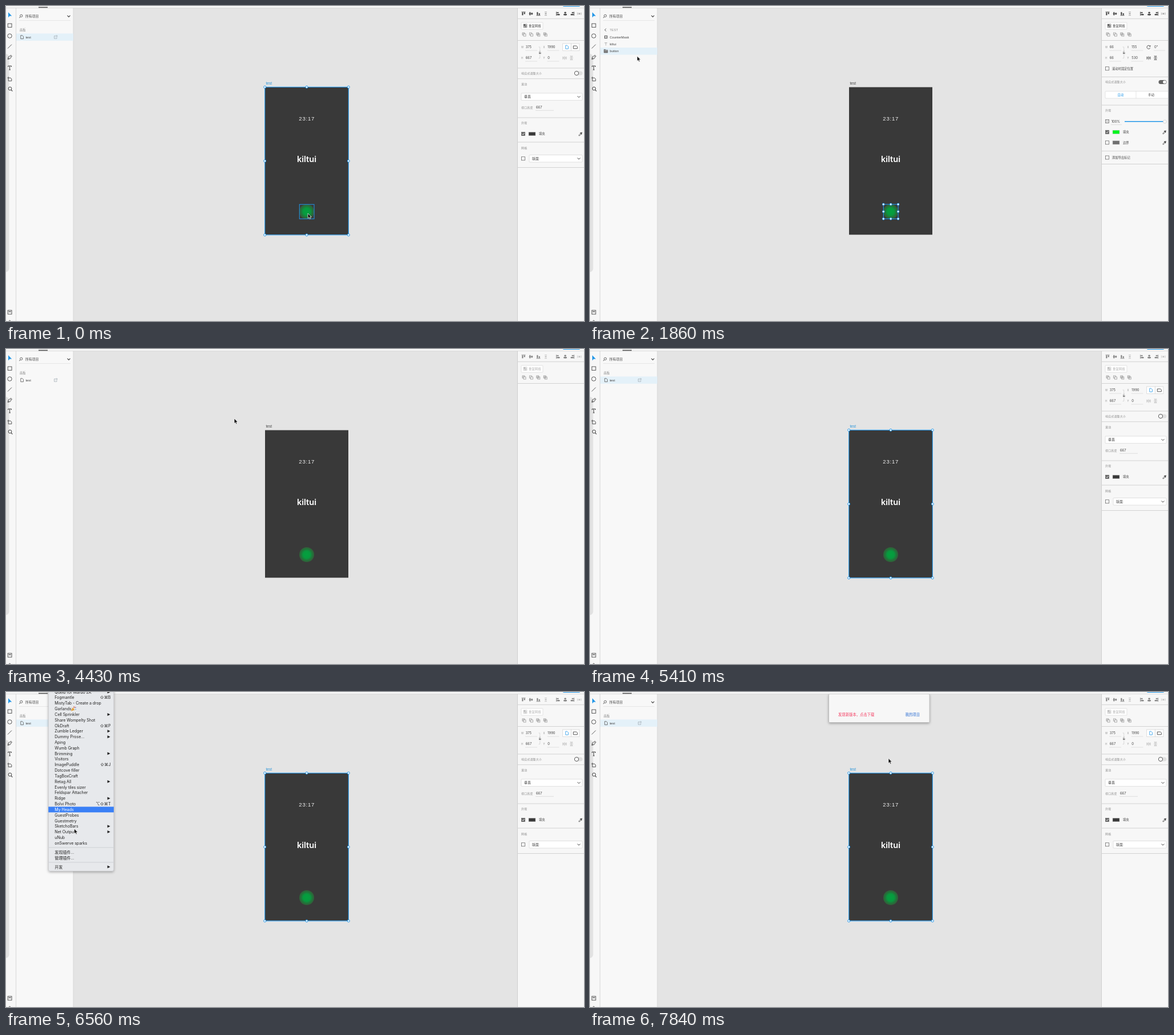
An HTML page for the animation above (8 s loop, 1013 by 553 pixels).

```html
<!DOCTYPE html>
<html lang="zh-CN">
<head>
<meta charset="utf-8">
<title>Design tool</title>
<style>
html, body { margin: 0; width: 100%; height: 100%; background: #e4e4e4; }
svg { display: block; position: fixed; inset: 0; width: 100%; height: 100%; }
text { font-family: Inter, "Noto Sans CJK SC", "Noto Sans CJK", "DejaVu Sans", sans-serif; white-space: pre; }
.arial { font-family: "Liberation Sans", "Noto Sans CJK SC", "Noto Sans CJK", sans-serif; }
.menu { letter-spacing: -.08px; }
.label { letter-spacing: .25px; }
</style>
</head>
<body>
<svg id="stage" viewBox="0 0 1013 553" xmlns="http://www.w3.org/2000/svg"></svg>
<script>
const INK = '#444', GREY = '#8c8c8c', PALE = '#b4b4b4', BLUE = '#2196e8', RULE = '#d9d9d9';

// SVG helpers; text is placed by its vertical centre
const rect = (x, y, w, h, fill = 'none', more = '') =>
  `<rect x="${x}" y="${y}" width="${w}" height="${h}" fill="${fill}" ${more}/>`;
const path = (d, stroke = INK, width = .9, fill = 'none') =>
  `<path d="${d}" stroke="${stroke}" stroke-width="${width}" fill="${fill}"/>`;
const circle = (x, y, r, fill = 'none', stroke = 'none', width = 1) =>
  `<circle cx="${x}" cy="${y}" r="${r}" fill="${fill}" stroke="${stroke}" stroke-width="${width}"/>`;
const text = (x, y, str, size = 5.5, fill = INK, more = '') =>
  `<text x="${x}" y="${y + size * .36}" font-size="${size}" fill="${fill}" ${more}>${str}</text>`;
const group = (id, ...parts) => `<g id="${id}">${parts.join('')}</g>`;
const at = (x, y, ...parts) => `<g transform="translate(${x} ${y})">${parts.join('')}</g>`;
const line = (x1, y, x2, color = RULE, width = .8) => path(`M${x1} ${y}H${x2}`, color, width);
const outline = (color = INK, width = .9) => `stroke="${color}" stroke-width="${width}"`;

const label = (y, str) => text(903, y, str, 4.9, GREY, 'class="label"');
const rule = y => line(897, y, 1013, '#d2d2d2', 1);
const chevron = (x, y, w = 1) => path(`M${x - 2.5} ${y - 1.2}l2.5 2.5 2.5-2.5`, INK, w);
const check = (y, str, on) => rect(903.5, y - 3, 6, 6, on ? '#666' : '#fff', outline('#666', .8)) +
  (on ? path(`M904.8 ${y}l1.3 1.5 2.4-3`, '#fff', .9) : '') + text(915, y, str, 5.3);
const dropdown = (x, y, str) =>
  rect(x, y - 6.3, 1010 - x, 12.6, '#fff', `rx="1" ${outline('#d4d4d4', .7)}`) +
  text(x + 5, y, str, 6) + chevron(1004, y);
const field = (x, y, name, value) => text(x, y, name, 4.2, GREY) +
  text(x + 7.7, y, value, 5.8) + line(x + 7, y + 6, x + 28);
const dropper = y => at(1007, y, path('M-3 3.3l.4-1.6 3-3 1.2 1.2-3 3z', INK, .8),
  path('M-.6-2.2l2.8 2.8M.8-.8l1.8-1.8', INK, 1.5));
const fillRow = (y, color, str, on) => check(y, '', on) +
  rect(916, y - 3.2, 12, 6.4, color, outline('#ccc', .5)) + text(934, y, str, 5.3) + dropper(y);
const exportIcon = (x, y, color) =>
  at(x, y, path('M0-2H-2.5V2.7H2V.5M-.5.8L2.5-2.4M.2-2.6H2.7V-.2', color, .8));
const pageIcon = (x, y, color) => path(`M${x - 2.2} ${y - 3}h2.8l1.8 1.8v4.2h-4.6z`, color, .8);
const frame = (x, y, w, h, r) => {
  let out = rect(x, y, w, h, 'none', outline(BLUE, 1.1));
  for (const i of [0, .5, 1]) for (const j of [0, .5, 1])
    if (i !== .5 || j !== .5) out += circle(x + w * i, y + h * j, r, '#fff', BLUE, 1);
  return out;
};

function toolbar() {
  return rect(0, 0, 18, 553, '#f7f7f7') + rect(-10, 84, 15.5, 383, '#e2e2e2', 'rx="6"') +
    path('M4 11V20.3L6.4 17.6H10.2Z', 'none', 0, BLUE) +
    rect(3.2, 31, 6.8, 6.3, 'none', outline()) + circle(6.5, 52.5, 3.7, 'none', INK, .9) +
    path('M3 74.5L10 67.5') +
    path('M3.2 93.5L4.2 89.2 7.6 87.4 9.2 89.2 7.4 92.4ZM7.4 87.2L8.6 86.2 10.4 88.2 9.4 89.3M3.4 93.3L6 90.6') +
    path('M3.7 107V105.2H9.5V107M6.6 105.2V112M5.2 112H8', INK, 1) +
    path('M4.2 124.2V126.2H8L9.8 128V131.6H4.2V126.2M2.4 126.2H4.2') +
    circle(7, 145, 2.9, 'none', INK, 1) + path('M9.1 147.2L11.3 149.6', INK, 1.2) +
    rect(3.2, 534.2, 6.8, 6.8, 'none', outline()) + path('M4.6 536.6H8.6', INK, 1.3) +
    path('M5 553L6.5 551.8 8 553') + path('M17.6 3V553', '#d4d4d4', 1);
}

function layers() {
  const marked = '#e4f1f9';
  return rect(18, 0, 100, 553, '#f8f8f8') + path('M118 3V553', '#d4d4d4', .8) +
    circle(26.7, 17.2, 2.1, 'none', INK, .8) + path('M25.2 18.8L23.2 21', INK, .9) +
    text(34, 17.8, '所有项目', 5.8) + chevron(110, 17.8, 1.2) + line(23, 25.5, 113, '#e2e2e2') +
    group('boardList',
      text(24, 42, '画板', 5.3, GREY),
      group('rowMark', rect(18, 48.3, 100, 12.6, marked)),
      pageIcon(28, 54.6, '#555'), text(34.5, 54.5, 'test', 5.8, INK, 'class="arial"'),
      exportIcon(87, 54.5, '#a5b0b8')) +
    group('itemList',
      path('M28.2 39.6L25.8 42 28.2 44.4', INK, .9),
      text(34.5, 42, 'TEST', 5.4, GREY, 'class="arial label"'),
      rect(25, 51.7, 5.6, 5.6, '#777', 'rx=".6"'), circle(27.8, 54.5, 1.4, '#eee'),
      text(34.5, 54.5, 'CounterMask', 5.7, INK, 'class="arial"'),
      path('M25.8 65.2V64.6H29.8V65.2M27.8 64.6V69.4', '#999', .7),
      text(34.5, 67, 'kiltui', 5.7, INK, 'class="arial"'),
      rect(18, 73, 100, 12.5, marked),
      path('M24.6 76.4H27L27.8 77.4H31V82H24.6Z', '#666', .7, '#777'),
      line(25, 78.6, 30.6, '#ddd', .5),
      text(34.5, 79, 'button', 5.7, INK, 'class="arial"'),
      group('exportMark'),
      group('rowIcons',
        rect(95.2, 78.5, 4, 3.4, '#b4bcc2'), path('M96 78.5V77.3a1.2 1.2 0 0 1 2.4 0V78.5', '#b4bcc2', .7),
        path('M104.8 79.3Q107.8 76 110.8 79.3Q107.8 82.4 104.8 79.3Z', '#b4bcc2', .7),
        circle(107.8, 79.3, 1, '#b4bcc2')));
}

function artboard() {
  return `<defs><radialGradient id="glow"><stop offset="0" stop-color="#04a03f"/><stop offset=".48" stop-color="#079a3e"/>
    <stop offset=".78" stop-color="#23713a"/><stop offset="1" stop-color="#316039"/></radialGradient>
    <filter id="shade" x="-20%" y="-20%" width="140%" height="140%"><feDropShadow dx="0" dy="1.5" stdDeviation="2" flood-opacity=".32"/></filter></defs>` +
    text(455.5, 136, 'test', 6.5, INK, 'id="boardName" class="arial"') +
    rect(454, 142.5, 146, 259, '#393939') +
    text(527.2, 198, '23:17', 9.6, '#f2f2f2', 'class="arial" text-anchor="middle" letter-spacing=".75"') +
    text(527, 268.6, 'kiltui', 14.6, '#fff', 'text-anchor="middle" font-weight="600"') +
    circle(527, 361, 13, 'url(#glow)') +
    group('hoverFrame', rect(514.3, 348.3, 25.7, 25.4, 'none', outline(BLUE, 1))) +
    group('boardFrame', frame(453.7, 142.3, 146.6, 259.6, 2)) +
    group('buttonFrame', frame(514.3, 348.2, 25.8, 25.4, 1.9));
}

function alignIcons() {
  const bars = '<path d="M-2.7-2.3H-.6V2.8H-2.7ZM.7-2.3H2.8V.8H.7Z"/>';
  const mid = '<path d="M-2.7-2.8H-.6V2.8H-2.7ZM.7-1.7H2.8V1.7H.7Z"/>';
  const edge = dy => `<path d="M-3.5 ${dy - .4}h7v.8h-7z"/>`;
  const shapes = [bars + edge(-3.2), mid + edge(0), `<g transform="scale(1 -1)">${bars}${edge(-3.2)}</g>`,
    '<path d="M-2-3.5H2v1H-2zM-1.5-1.2H1.5V1.2H-1.5zM-2 2.5H2v1H-2z"/>'];
  return shapes.map((s, i) =>
    `<g fill="${i > 2 ? '#aaa' : INK}">` + at(907 + 13 * i, 13.5, s) +
    `<g transform="translate(${967.7 + 12.4 * i} 13.5) rotate(-90)">${s}</g></g>`).join('');
}

function inspector() {
  const gridDots = [0, 1, 2, 3].map(i =>
    rect(907.2 + i % 2 * 3.3, 32 + (i >> 1) * 3.3, 2.4, 2.4, i ? 'none' : '#555', outline('#555', .7))).join('');
  const pairs = [0, 1, 2, 3].map(i => at(908 + 12.4 * i, 50,
    rect(-3, -3, 4, 4, i === 1 ? 'none' : '#ddd', outline(GREY, .7)),
    rect(-1, -1, 4, 4, i > 1 ? 'none' : '#f7f7f7', outline(GREY, .7)))).join('');
  const flips = color => path('M976 89V93.4L978 91.2ZM982 89V93.4L980 91.2ZM979 88V94.5', color, .8) +
    path('M988.8 88H993.2L991 90.2ZM988.8 94.4H993.2L991 92.2ZM988 91.2H994', color, .8);
  const sizes = (w, h, x, y) => field(903, 72, 'W', w) + field(903, 91, 'H', h) +
    field(941.5, 72, 'X', x) + field(941.5, 91, 'Y', y) +
    path('M933.5 72H935.7V78M935.7 86V91.5H933.5', '#ccc', .7) +
    rect(934, 81.4, 3.6, 2.8, GREY) + path('M934.8 81.4V80a1 1 0 0 1 2 0', GREY, .7);

  const board = group('boardPanel',
    sizes('375', '667', '1990', '0'), flips(PALE),
    rect(975.7, 66, 14.6, 12.4, '#fff', outline('#d0d0d0', .7)), pageIcon(983, 72.2, BLUE),
    rect(990.3, 66, 14.6, 12.4, '#fff', outline('#d0d0d0', .7)), path('M994.3 70H999.8L1001.3 71.5V74.8H994.3Z', INK, .9),
    rule(109), label(118, '响应式调整大小'),
    rect(996.5, 114.5, 14, 7, '#e0e0e0', 'rx="3.5"'), circle(1000, 118, 3.6, '#fff', INK, .9),
    rule(127.7), label(137.5, '滚动'), dropdown(903, 159.3, '垂直'),
    label(178, '视口高度'), text(929, 178, '667', 5.8), line(928, 183.3, 960),
    rule(196), label(205, '外观'), fillRow(224.5, '#393939', '填充', true),
    rule(239), label(249, '网格'), check(267.8, '', false), dropdown(917, 267.8, '版面'),
    rule(283.5));

  const button = group('buttonPanel',
    sizes('66', '66', '155', '530'), flips(INK),
    path('M981.5 70.6A3 3 0 1 0 981.8 73.4M982 69V71H980', INK, .9), text(989, 72, '0°', 5.8), line(988, 78, 1008),
    check(109.8, '滚动时固定位置', false),
    rule(124.5), label(133.5, '响应式调整大小'),
    rect(996.5, 130, 14, 7, '#666', 'rx="3.5"'), circle(1007, 133.5, 2.8, '#fff'),
    rect(903, 149.7, 112, 12.4, '#fff', `rx="1" ${outline('#d8d8d8', .7)}`), path('M957 149.7V162', '#d8d8d8', .7),
    text(930, 156, '自动', 5.4, BLUE, 'text-anchor="middle"'), text(983.5, 156, '手动', 5.4, INK, 'text-anchor="middle"'),
    rule(174), label(183.5, '外观'),
    rect(903.5, 199.5, 6, 6, '#eee', outline('#777', .8)), path('M904 205L909 200M904 202L906 200M907 205L909 203', GREY, .6),
    text(913.7, 202.6, '100%', 5.8), line(913, 208.3, 932),
    line(937, 202.8, 1007, BLUE, 1.5), circle(1007.5, 203, 3, '#f8f8f8', '#ccc', .7),
    fillRow(221.3, '#00f51f', '填充', true), fillRow(239.8, '#707070', '边界', false),
    rule(254.7),
    group('exportOff', check(266, '添加导出标记', false)),
    group('exportOn', check(266, '添加导出标记', true)),
    rule(277.5));

  return rect(896.5, 0, 117, 553, '#f7f7f7') + path('M896.5 3V553', '#d0d0d0', 1) +
    group('aligns', alignIcons()) + rule(22.3) +
    rect(903, 28.8, 38, 12.2, '#fff', `rx="1" ${outline('#dcdcdc', .8)}`) +
    group('repeat', gridDots, text(916, 34.9, '重复网格', 5.4, INK, 'font-weight="500"')) +
    pairs + rule(60.5) + board + button;
}

// Name, then ">" for a submenu or a shortcut
const PLUGINS = ['Quelb for Mardo ZK|>', 'Fogmantle|⇧⌘B', 'MistyTab - Create a drop', 'Garlands', 'Cell Sprinkler|>',
  'Share Wompelty Shot', 'OkDraft|⇧⌘P', 'Zumble Ledger|>', 'Dummy Prose...|>', 'Aping', 'Wumb Graph', 'Brimming|>',
  'Visitors', 'ImagePuddle|⇧⌘J', 'Dotcove filler', 'TagBoxCraft', 'Retag All|>', 'Evenly tiles sizer',
  'Feldspar Attacher', 'Ridge|>', 'Bolvi Photo|⌥⇧⌘T', 'My Heads', 'GuestProbes', 'Guestmetry', 'SketchoBars|>',
  'Net Output|>', 'uNub', 'onSwerve sparks'];
const rowY = i => .1 + 9.82 * i;

function menu() {
  const item = (y, str, key = '', id = '') =>
    text(85.3, y, str, 7.1, '#262626', `class="menu" ${id}`) +
    (key === '>' ? path(`M177.7 ${y - 2.5}l5 2.5-5 2.5z`, 'none', 0, '#262626')
      : key && text(183.5, y, key, 7.1, '#262626', 'text-anchor="end"'));
  const party = at(118.5, 29.5, path('M-4.5 4L-2-2.2 2.2 2Z', 'none', 0, '#e5a33b'),
    circle(.5, -3, .9, '#d9534f'), circle(3.4, -2.4, .9, '#7a5bc0'), circle(3.6, 1, .8, '#3f9ad6'),
    path('M0-.4Q2-1 1.6-4', '#d8843a', .8));
  return group('menu',
    rect(74.3, -12, 114.6, 326.4, '#e7e9ec', `rx="3" ${outline('#b9b9bc', .6)} filter="url(#shade)"`),
    rect(74.3, 0, 114.6, 9.9, '#3a80f6', 'id="pick"'),
    ...PLUGINS.map((p, i) => { const [name, key] = p.split('|'); return item(rowY(i), name, key, `id="item${i}"`); }),
    party, line(74.5, 273, 188.7, '#cdd0d4', 1), item(281.2, '发现插件...'), item(291, '管理插件...'),
    line(74.5, 299, 188.7, '#cdd0d4', 1), item(307, '开发', '>'));
}

const dialog = () => group('dialog',
  rect(418.5, 3.5, 176.5, 50, '#f7f7f7', `rx="1.5" ${outline('#b0b0b0', .7)} filter="url(#shade)"`),
  text(435, 40, '发现新版本，点击下载', 6.35, '#f4365c'),
  text(552.5, 40, '我的项目', 6.4, '#2a6dd2', 'font-weight="500"'));

const stage = document.getElementById('stage');
stage.innerHTML = rect(0, 0, 1013, 553, '#e4e4e4') + artboard() + toolbar() + layers() + inspector() + dialog() +
  rect(0, 0, 1013, 3.2, '#f8f8f8') + line(0, 3.4, 1013, '#d2d2d2', .8) + rect(57, 1.6, 16, 1.6, '#555') +
  path('M975 -1Q976 .5 978 .5H1004Q1006 .5 1007 -1', BLUE, 1) + menu() +
  group('cursor', path('M0 0V8.7L2 6.9 3.4 9.9 4.9 9.2 3.6 6.3H6.3Z', '#fff', .7, '#111'));

// Time, pointer position, and what changes at that moment
const STEPS = [
  [0, 529, 364, { sel: 'board', hover: 1, dim: 0, icons: 0, exported: 0, menu: 0, pick: -1, dialog: 0 }],
  [180, 529, 364, { sel: 'button', hover: 0 }],
  [480, 100, 140],
  [750, 420, 190], [930, 810, 232], [1110, 887, 243], [1300, 780, 215], [1490, 430, 150], [1680, 132, 105],
  [1860, 82.5, 88], [2040, 75, 89], [2220, 80, 82, { icons: 1 }], [2400, 86, 79], [2570, 90, 77], [2750, 87, 79],
  [3110, 88, 79, { exported: 1 }],
  [3470, 113.5, 72], [3680, 180, 80, { icons: 0 }], [3860, 290, 95], [4050, 330, 102],
  [4240, 330, 102, { sel: 'none', dim: 1 }], [4430, 400, 122],
  [4700, 459, 137, { sel: 'board' }], [4880, 390, 100], [5060, 250, 45], [5230, 130, 6], [5410, 100, -30],
  [5860, 100, -30, { menu: 1 }],
  [6210, 117, 140, { pick: 12 }], [6390, 118, 195, { pick: 17 }], [6560, 119.5, 240, { pick: 21 }],
  [6740, 119.5, 250, { pick: 25 }], [6920, 120, 252, { pick: 26 }], [7100, 120, 254],
  [7270, 300, 215], [7450, 439, 165],
  [7630, 490, 135, { menu: 0, pick: -1 }], [7840, 523, 116.5, { dialog: 1 }]
];
const LOOP = 8000;
const el = id => document.getElementById(id);
const show = (id, on) => { el(id).style.display = on ? '' : 'none'; };

function render(index) {
  const s = Object.assign({}, ...STEPS.slice(0, index + 1).map(step => step[3]));
  const [, x, y] = STEPS[index];
  const onButton = s.sel === 'button', onBoard = s.sel === 'board';
  el('cursor').setAttribute('transform', `translate(${x} ${y})`);
  show('hoverFrame', s.hover);
  show('boardFrame', onBoard);
  show('boardPanel', onBoard);
  show('rowMark', onBoard);
  show('boardList', !onButton);
  show('itemList', onButton);
  show('buttonFrame', onButton);
  show('buttonPanel', onButton);
  show('rowIcons', s.icons);
  show('exportOn', s.exported);
  show('exportOff', !s.exported);
  show('menu', s.menu);
  show('pick', s.pick >= 0);
  show('dialog', s.dialog);
  el('exportMark').innerHTML = s.icons || s.exported ? exportIcon(87, 79, s.exported ? '#66717a' : '#a5b0b8') : '';
  el('boardName').setAttribute('fill', onBoard ? '#2b95d8' : INK);
  el('aligns').style.opacity = s.dim ? .65 : 1;
  el('repeat').style.opacity = s.dim ? .4 : 1;
  el('pick').setAttribute('y', rowY(s.pick) - 4.9);
  PLUGINS.forEach((_, i) => el('item' + i).setAttribute('fill', i === s.pick ? '#fff' : '#262626'));
}

const start = performance.now();
let shown = -1;
function tick() {
  const t = (performance.now() - start) % LOOP;
  const index = STEPS.findLastIndex(step => step[0] <= t);
  if (index !== shown) render(shown = index);
  requestAnimationFrame(tick);
}
tick();
</script>
</body>
</html>
```
